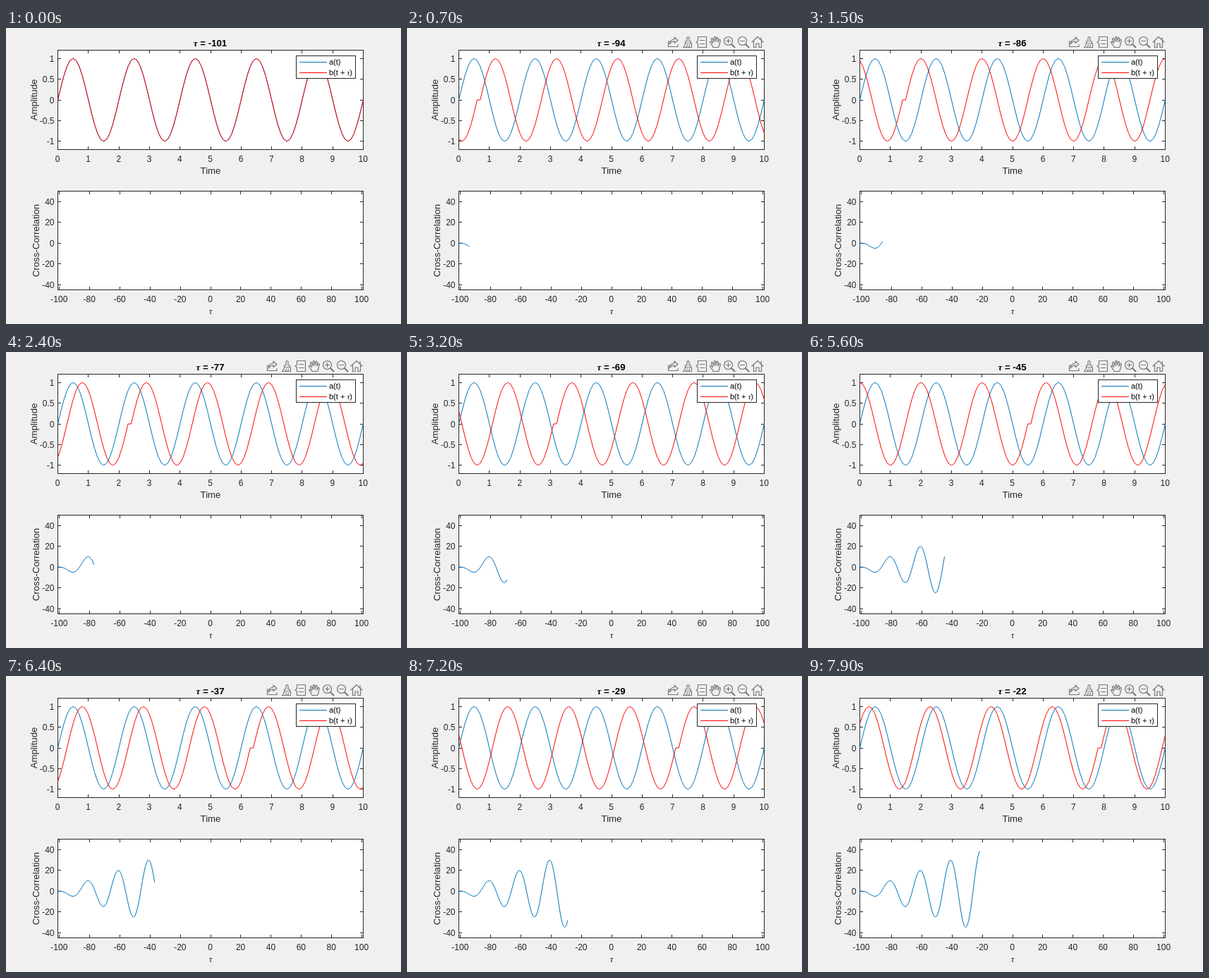
Write an HTML page that moves like this. It is 560 px wide and 420 px high and loops after 8000 ms.

```html
<!DOCTYPE html>
<html lang="en">
<head>
<meta charset="utf-8">
<title>Cross-correlation of two sines</title>
<style>
  html, body { margin: 0; width: 100%; height: 100%; overflow: hidden; background: #f0f0f0; }
  svg { display: block; width: 560px; height: 420px; font-family: "Liberation Sans", Arial, sans-serif; }
  .axes { fill: none; stroke: #262626; shape-rendering: crispEdges; }
  .ticks { font-size: 12px; fill: #262626; }
  .label { font-size: 13.2px; fill: #262626; text-anchor: middle; }
  .title { font-size: 13.2px; font-weight: bold; text-anchor: middle; }
  .legend { font-size: 11px; }
  .tau { font-family: "Liberation Serif", "Times New Roman", serif; font-style: italic; }
  .line { fill: none; stroke-linejoin: round; }
  .blue { stroke: #0072bd; }
  .red { stroke: #f00; }
  #tools { fill: none; stroke: #777; stroke-width: 1.2; stroke-linejoin: round; stroke-linecap: round; }
</style>
</head>
<body>
<svg viewBox="0 0 560 420">
  <rect width="560" height="420" fill="#f0f0f0"/>
  <rect x="73" y="31" width="434" height="142" fill="#fff"/>
  <rect x="73" y="231" width="434" height="141" fill="#fff"/>
  <g id="axes"></g>

  <text class="label" x="290" y="207">Time</text>
  <text class="label" transform="translate(44 102) rotate(-90)">Amplitude</text>
  <text class="label" transform="translate(46.5 301.5) rotate(-90)">Cross-Correlation</text>
  <text class="label tau" x="290" y="406">τ</text>
  <text class="title" x="289.5" y="26"><tspan class="tau">τ</tspan> = <tspan id="lag"></tspan></text>

  <path id="fixed" class="line blue"/>
  <path id="moving" class="line red"/>
  <path id="corr" class="line blue"/>

  <g class="legend">
    <rect class="axes" x="411.5" y="39.5" width="84" height="32" style="fill:#fff"/>
    <path class="axes blue" d="M416 48.5H455"/>
    <path class="axes red" d="M416 63.5H455"/>
    <text x="458" y="52">a(t)</text>
    <text x="458" y="67">b(t + <tspan class="tau">τ</tspan>)</text>
  </g>

  <g id="tools">
    <!-- export -->
    <path d="M373 19H370.5V26.500H384V23.500M372 23C373 18 376 16 379 16V13L384 17.500L379 21.500V18.800C376 19 374 20.500 372 23Z"/>
    <!-- brush -->
    <path d="M397 19V13.500Q398.500 11.500 400 13.500V19H402.500V22H394.500V19ZM394.500 22Q394 25.500 391.500 27.500H403.500V22M396 27L397.500 24.500M399.500 27L400.500 24.500"/>
    <!-- data tip -->
    <path d="M412.500 12.500H424.500V27.500H412.500V22L410 20L412.500 18ZM415.500 17.500H422M415.500 22.500H422"/>
    <!-- hand -->
    <path d="M434 27.500C433 24 430.500 22.500 429.500 20C430 18.500 431.500 19 433.500 21.500L431.500 15.500C431.500 14 433.300 14 433.700 15.500L435.500 19.500V13.500C435.700 12 437.500 12 437.700 13.500V19L439.300 14C440 13 441.500 13.300 441.300 15L440.700 20L442.500 16.800C443.500 16 444.700 17 444.200 18.200C443 22 443 25 441.500 27.500Z"/>
    <!-- zoom in and out -->
    <g id="zoom"><circle cx="455.500" cy="18.500" r="6"/><path d="M452.500 18.500H458.500"/><path stroke-width="2" d="M460 23L464.500 27.500"/></g>
    <path d="M455.500 15.500V21.500"/>
    <use href="#zoom" x="20"/>
    <!-- home -->
    <path d="M489 20L497 12.500L505 20M491.500 18V27.500H495V22H499V27.500H502.500V18M502 17V13.500"/>
  </g>
</svg>
<script>
  const $ = id => document.getElementById(id);
  const STEP = 100, LOOP = 8000, N = 101;
  const L = 73.5, R = 506.5;

  const makePlot = (top, bottom, xMin, xMax, yMin, yMax) => ({
    top, bottom,
    x: v => L + (v - xMin) / (xMax - xMin) * (R - L),
    y: v => bottom - (v - yMin) / (yMax - yMin) * (bottom - top)
  });
  const signals = makePlot(31.5, 172.5, 0, 10, -1.2, 1.2);
  const result = makePlot(231.5, 371.5, -101, 101, -45, 50);

  const range = (from, to, step) =>
    Array.from({ length: Math.round((to - from) / step) + 1 }, (_, i) => from + i * step);

  function drawAxes({ top, bottom, x, y }, xTicks, yTicks) {
    let d = `M${L} ${top}H${R}V${bottom}H${L}Z`, text = "";
    const snap = v => Math.floor(v) + 0.5;
    for (const v of xTicks) {
      const px = snap(x(v));
      d += `M${px} ${top}v4.500M${px} ${bottom}v-4.500`;
      text += `<text text-anchor="middle" x="${x(v) - 0.3}" y="${bottom + 17.5}">${v}</text>`;
    }
    for (const v of yTicks) {
      const py = snap(y(v));
      d += `M${L} ${py}h4.500M${R} ${py}h-4.500`;
      text += `<text text-anchor="end" x="68.5" y="${y(v) + 4.5}">${v}</text>`;
    }
    $("axes").innerHTML += `<path class="axes" d="${d}"/><g class="ticks">${text}</g>`;
  }

  const wave = i => Math.sin(Math.PI * i / 10);

  // Sum over the part where the two finite signals overlap
  function overlap(k) {
    let sum = 0;
    for (let i = 0; i <= k; i++) sum += wave(i) * wave(i + N - 1 - k);
    return sum;
  }

  const trace = (plot, count, xOf, yOf) => "M" + Array.from({ length: count }, (_, i) =>
    plot.x(xOf(i)).toFixed(2) + " " + plot.y(yOf(i)).toFixed(2)).join("L");

  drawAxes(signals, range(0, 10, 1), range(-1, 1, 0.5));
  drawAxes(result, range(-100, 100, 20), range(-40, 40, 20));
  $("fixed").setAttribute("d", trace(signals, N, i => i / 10, wave));

  let shown = -1;
  function draw(k) {
    if (k === shown) return;
    shown = k;
    $("lag").textContent = k - N;
    $("tools").style.display = k ? "" : "none";
    $("moving").setAttribute("d", trace(signals, N, i => i / 10, i => wave((i - k + N) % N)));
    $("corr").setAttribute("d", trace(result, k + 1, i => i - N, overlap));
  }

  const start = performance.now();
  function tick() {
    draw(Math.floor((performance.now() - start) % LOOP / STEP));
    requestAnimationFrame(tick);
  }
  tick();
</script>
</body>
</html>
```
